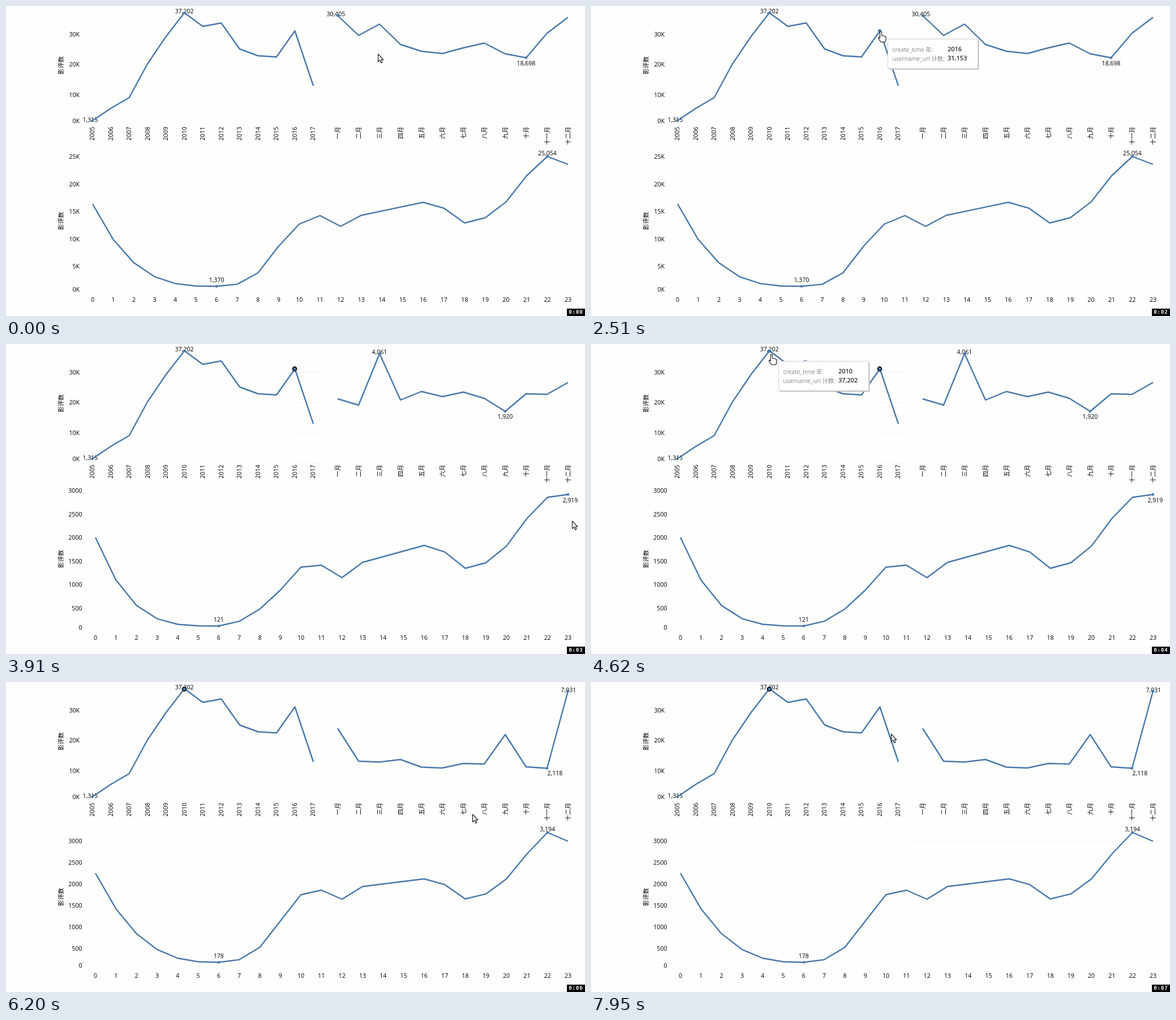
Recreate the animation shown at these times as an HTML page. Size 1023 px wide and 548 px high, loop 8000 ms.

```html
<!DOCTYPE html>
<html lang="zh">
<head>
<meta charset="utf-8">
<title>影评数</title>
<style>
  html, body { margin: 0; width: 100%; height: 100%; overflow: hidden; background: #fefefe; }
  svg { display: block; width: 1023px; height: 548px; }
  text { font: 10.6px "Open Sans", "Noto Sans", "Noto Sans CJK SC", "Noto Sans CJK", sans-serif; fill: #000; }
  .cjk { font: 10.7px "Noto Sans CJK SC", "Noto Sans CJK", sans-serif; }
  .key { font-size: 10.3px; fill: #858585; }
  .val { font-size: 11px; font-weight: 600; fill: #2a2a2a; }
  .clock { font: bold 9px "DejaVu Sans Mono", monospace; fill: #fff; }
  .line { fill: none; stroke: #4878a9; stroke-width: 2.4; stroke-linejoin: round; }
  .dot { fill: #4878a9; }
  .grid { stroke: #f3f3f3; }
  .icon { fill: none; stroke: #555; stroke-width: 1.2; }
  .cursor { fill: #fff; stroke: #111; stroke-width: 1.1; stroke-linejoin: round; }
</style>
</head>
<body>
<svg id="stage" viewBox="0 0 1023 548"></svg>
<script>
const LOOP = 8000, STEP = 120.45;
const stage = document.getElementById('stage');

function add(parent, tag, attrs = {}, content) {
  const el = document.createElementNS('http://www.w3.org/2000/svg', tag);
  for (const k in attrs) el.setAttribute(k, attrs[k]);
  if (content !== undefined) el.textContent = content;
  parent.append(el);
  return el;
}
const group = parent => add(parent, 'g');
const show = (el, on) => el.setAttribute('visibility', on ? 'visible' : 'hidden');
const move = (el, x, y) => el.setAttribute('transform', `translate(${x} ${y})`);
const mix = (a, b, k) => a + (b - a) * k;

// Text centred vertically on y
function label(parent, s, x, y, anchor = 'middle', cls = '') {
  return add(parent, 'text', { x, y: y + 3.9, 'text-anchor': anchor, class: cls }, s);
}
function upright(parent, s, x, y, anchor, cls) {
  add(parent, 'text', {
    transform: `translate(${x + 3.8} ${y}) rotate(-90)`, 'text-anchor': anchor, class: cls
  }, s);
}
// Evenly spaced ticks; the zero label is kept inside the plot
function axis(parent, x, zero, gap, count, name) {
  for (let i = 0; i < count; i++) label(parent, name(i), x, i ? zero - i * gap : zero - 7.5, 'end');
}
// marks: [point index, text, dy, dx]
function series(parent, x0, x1, ys, marks) {
  const px = i => mix(x0, x1, i / (ys.length - 1));
  for (const [i, s, dy, dx = 0] of marks) label(parent, s, px(i) + dx, ys[i] + dy);
  add(parent, 'polyline', { class: 'line', points: ys.map((y, i) => `${px(i)},${y}`).join(' ') });
  for (const [i] of marks) add(parent, 'circle', { class: 'dot', cx: px(i), cy: ys[i], r: 2.3 });
}

// A day runs between turning points: a night-time decay, then eased climbs
const turns = [0, 6, 9, 10, 11, 12, 13, 16, 18, 21, 22, 23];
function day({ levels, decay, rise }) {
  const eases = {
    0: k => 1 - (1 - k) ** decay,
    6: k => k ** rise,
    16: k => k ** 1.8,
    18: k => k ** 2
  };
  return Array.from({ length: 24 }, (_, h) => {
    const i = Math.max(1, turns.findIndex(turn => turn >= h));
    const from = turns[i - 1], k = (h - from) / (turns[i] - from);
    return mix(levels[i - 1], levels[i], eases[from] ? eases[from](k) : k);
  });
}

const faint = group(stage);
const leftGrid = group(faint), hourGrid = group(faint);
for (let i = 0; i < 4; i++) add(leftGrid, 'path', { class: 'grid', d: `M503 ${50.5 + i * 53.5}h57` });
add(hourGrid, 'path', { class: 'grid', d: 'M568 281.5H1010' });

// Yearly chart and shared labels
const base = group(stage);
axis(base, 130, 210.5, 53.5, 4, i => i * 10 + 'K');
for (const y of [105, 380]) upright(base, '影评数', 97.5, y, 'middle', 'cjk');
for (let i = 0; i < 13; i++) upright(base, 2005 + i, 152.5 + i * 32.5, 213.5, 'end', '');
'一 二 三 四 五 六 七 八 九 十 十一 十二'.split(' ')
  .forEach((m, i) => upright(base, m + '月', 586 + i * 37, 213.5, 'end', 'cjk'));
series(base, 152.5, 543, [203, 181, 162, 102, 54, 12, 36, 30, 76, 88, 90, 44, 141],
  [[0, '1,315', -2, -3.5], [5, '37,202', -3]]);

// Month and hour charts for each selection
const views = [
  {
    from: 0, to: 2880, left: 153, axisX: 130,
    gap: 48.5, ticks: 6, name: i => i * 5 + 'K',
    month: [17, 52, 32, 68, 80, 84, 74, 65.5, 84.5, 91.5, 48, 20],
    monthMarks: [[0, '30,405', -3, -3], [9, '18,698', 9.5]],
    levels: [350, 495.5, 424.5, 385.5, 370.5, 389.5, 370, 347, 383.5, 300, 266, 280],
    decay: 3.1, rise: 2.7,
    hourMarks: [[6, '1,370', -11.5], [22, '25,054', -6]]
  },
  {
    from: 2880, to: 5250, left: 158, axisX: 134.5,
    gap: 41.6, ticks: 7, name: i => i * 500,
    month: [97, 108, 17, 99, 84, 93, 85, 96, 119, 88, 89, 68],
    monthMarks: [[2, '4,061', -3], [8, '1,920', 9.5]],
    levels: [342, 498.5, 435, 394.5, 391, 413, 386, 356, 396.5, 308.5, 271, 266],
    decay: 3.6, rise: 1.85,
    hourMarks: [[6, '121', -11.5], [23, '2,919', 10, 4]]
  },
  {
    from: 5250, to: LOOP, left: 158, axisX: 134.5,
    gap: 38, ticks: 7, name: i => i * 500,
    month: [82, 140, 141.5, 137, 150.5, 152, 144, 145, 93, 150, 152.5, 16],
    monthMarks: [[10, '2,118', 9, 14], [11, '7,031', -2, 1]],
    levels: [338, 495.5, 422.5, 376, 368, 384, 361.5, 348, 383.5, 304, 266, 281.5],
    decay: 2.8, rise: 2.5,
    hourMarks: [[6, '178', -11.5], [22, '3,194', -5.5]]
  }
];
for (const v of views) {
  v.el = group(stage);
  axis(v.el, v.axisX, 508.7, v.gap, v.ticks, v.name);
  for (let h = 0; h < 24; h++) label(v.el, h, mix(v.left, 993, h / 23), 519);
  series(v.el, 586, 993, v.month, v.monthMarks);
  series(v.el, v.left, 993, day(v), v.hourMarks);
}

// Highlighted point: hovered, just clicked, then kept
const spots = [
  { x: 510, y: 44, hover: 1400, click: 2640, leave: 3220, end: 4870 },
  { x: 315, y: 12.5, hover: 4500, click: 4870, leave: 5720, end: LOOP }
];
for (const s of spots) s.el = add(stage, 'circle', { class: 'dot', cx: s.x, cy: s.y, stroke: '#0b0f18' });

// Tooltip
const tip = group(stage);
const shade = add(tip, 'rect', { fill: '#c4c4c4' });
const panel = add(tip, 'rect', { fill: '#fff', stroke: '#d0d0d0' });
label(tip, 'create_time 年:', 7.5, 18, 'start', 'key');
label(tip, 'username_url 计数:', 7.5, 34, 'start', 'key');
const yearText = label(tip, '', 105, 17, 'start', 'val');
const countText = label(tip, '', 105, 33, 'start', 'val');
const tools = group(tip);
label(tools, '只保留', 22, -13, 'start', 'cjk');
label(tools, '排除', 80, -13, 'start', 'cjk');
add(tools, 'path', { class: 'icon', d: 'M8-13l3 4 5-8M67-17l8 8M75-17l-8 8' });
for (const side of [-1, 1]) {
  add(tools, 'circle', { class: 'icon', cx: 124.8 + side * 1.8, cy: -13.2 + side * 1.2, r: 3 });
}
add(tools, 'path', { fill: '#111', d: 'M134-15h7l-3.5 4z' });
add(tools, 'path', { class: 'icon', 'stroke-dasharray': '2.6 1', d: 'M153-16h10M153-13h10M153-10h10' });

const tips = [
  { from: 1650, to: 3220, wide: 2880, tools: 2990, x: 525, y: 59, year: '2016', count: '31,153' },
  { from: 4500, to: 4870, wide: LOOP, tools: LOOP, x: 332, y: 31, year: '2010', count: '37,202' },
  { from: 4870, to: 5720, wide: 5250, tools: 5520, x: 330, y: 28, year: '2010', count: '37,202' }
];

// Pointer shapes, each drawn from its hot spot
const pointers = {
  arrow: 'M.5 0V13.5L3.6 10.7 5.8 15.6 8 14.6 5.9 9.9H9.8Z',
  hand: 'M-1.6 1.2q1.6-2 3.2 0v6l5 1.1q2.6.6 2.6 3v3l-1.6 4.4h-7.4l-4.6-6.2q-.6-2 1.3-2l1.5 1.5z',
  cross: 'M0-7L3-4H1.2V-.2H5V-2L8 1 5 4V2.2H1.2V6H3L0 9-3 6H-1.2V2.2H-5V4L-8 1-5-2V-.2H-1.2V-4H-3Z'
};
const pointer = add(stage, 'path', { class: 'cursor' });
// Places the pointer rests at or turns: arrive, leave, x, y
const stops = [
  [0, 0, 657, 85], [480, 480, 378, 18], [900, 2510, 512, 45], [2640, 3200, 512, 51],
  [3900, 3900, 1005, 316], [4520, 4750, 319, 18], [4870, 5640, 316, 15],
  [6400, 6520, 1000, 310], [6960, 7100, 944, 121], [7230, 7230, 990, 14],
  [7350, 7350, 925, 32], [7460, 7620, 1012, 95], [7770, 7770, 780, 25], [7940, LOOP, 530, 92]
];
function pointerAt(t) {
  const i = Math.max(1, stops.findIndex(s => s[1] >= t));
  const [, leave, x0, y0] = stops[i - 1], [arrive, , x1, y1] = stops[i];
  const k = Math.min(1, Math.max(0, (t - leave) / (arrive - leave)));
  const ease = (1 - Math.cos(Math.PI * k)) / 2;
  return [mix(x0, x1, ease), mix(y0, y1, ease)];
}
function shapeAt(t) {
  if (t >= 5250 && t < 5520) return 'cross';
  return (t >= 1280 && t < 3220) || (t >= 4500 && t < 5720) ? 'hand' : 'arrow';
}

// Clock
add(stage, 'rect', { x: 991, y: 535, width: 32, height: 13 });
const digits = [...'0:00'].map((c, i) =>
  add(stage, 'text', { class: 'clock', x: 997 + i * 6.3, y: 544.4, 'text-anchor': 'middle' }, c));

function setTip(t) {
  const c = tips.find(c => t >= c.from && t < c.to);
  show(tip, c);
  show(tools, c && t >= c.tools);
  if (!c) return;
  move(tip, c.x, c.y);
  const width = t >= c.wide ? 172 : 159, top = t >= c.tools ? -26 : 0;
  [[shade, 2], [panel, 0]].forEach(([el, d]) => {
    const box = { x: d - .5, y: top + d - .5, width, height: 52 - top };
    for (const k in box) el.setAttribute(k, box[k]);
  });
  yearText.textContent = c.year;
  countText.textContent = c.count;
}

function render(t) {
  for (const v of views) show(v.el, t >= v.from && t < v.to);
  show(leftGrid, t >= 3220 && t < 5250);
  show(hourGrid, t >= 6400);
  for (const s of spots) {
    show(s.el, t >= s.hover && t < s.end);
    const clicked = t >= s.click, held = clicked && t < s.leave;
    s.el.setAttribute('r', held ? 5 : clicked ? 3.5 : 3);
    s.el.setAttribute('stroke-width', held ? 2 : clicked ? 1.8 : 0);
  }
  setTip(t);
  const snapped = Math.min(LOOP, Math.floor((t + 30) / STEP) * STEP);
  move(pointer, ...pointerAt(snapped).map(Math.round));
  pointer.setAttribute('d', pointers[shapeAt(t)]);
  digits[3].textContent = Math.max(0, Math.floor((t - 20) / 1000));
}

const start = performance.now();
function tick() {
  render((performance.now() - start) % LOOP);
  requestAnimationFrame(tick);
}
tick();
</script>
</body>
</html>
```
